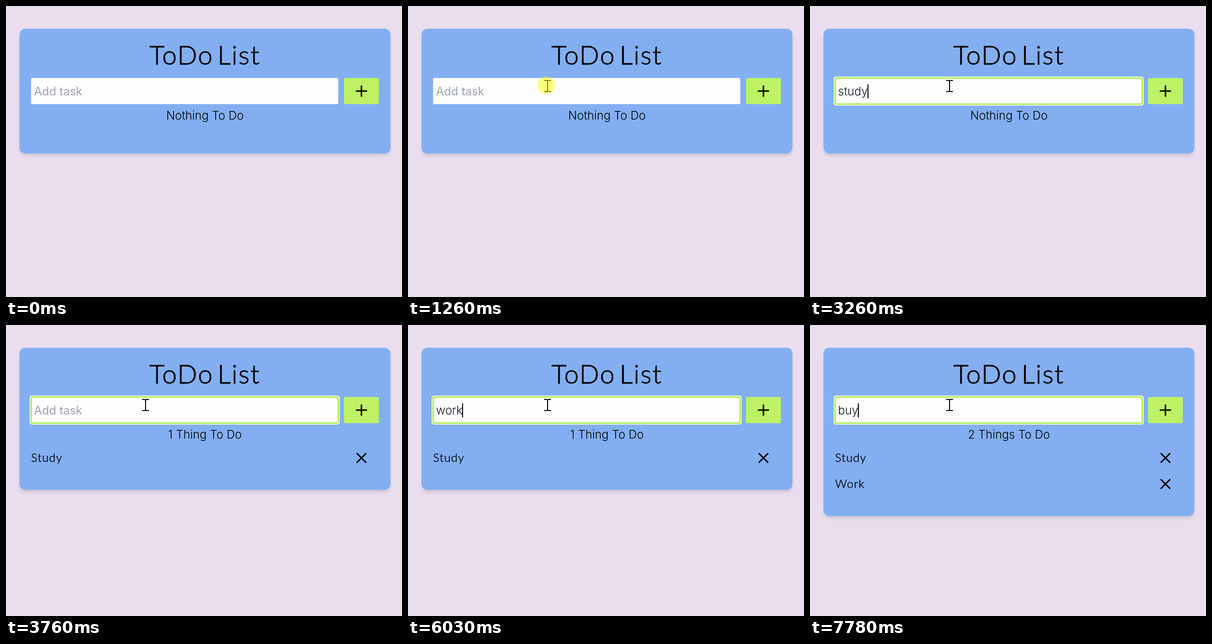
An HTML page for the animation above (8 s loop, 820 px wide and 602 px high).

```html
<!DOCTYPE html>
<html lang="en">
<head>
<meta charset="utf-8">
<title>ToDo List</title>
<style>
  html, body { margin: 0; width: 100%; height: 100%; overflow: hidden; background: #e9ddee; }
  svg { position: absolute; inset: 0; display: block; }
  #card {
    position: absolute; left: 28px; top: 47px; width: 768px; border-radius: 12px; background: #83aff2;
    box-shadow: 0 6px 9px -1.5px rgba(0,0,0,.1), 0 3px 6px -1.5px rgba(0,0,0,.06);
  }
  text { font: 24px Inter, sans-serif; white-space: pre; }
  .title { font: 300 54px Lato, sans-serif; letter-spacing: 2px; stroke: #000; stroke-width: .9; }
  .task { font: 300 24px Lato, sans-serif; letter-spacing: 1.2px; stroke: #000; stroke-width: .5; }
  #status { font-weight: 300; text-anchor: middle; }
  #hint { fill: #9ca3af; }
  #typed { font-weight: 300; fill: #111827; }
  .icon { fill: none; stroke: #000; stroke-width: 3; stroke-linecap: round; }
</style>
</head>
<body>
<div id="card"></div>
<svg width="820" height="602" viewBox="0 0 820 602">
  <rect width="820" height="1" fill="#dedbe2"/>
  <text class="title" x="297" y="120.5">ToDo</text>
  <text class="title" x="438" y="120.5">List</text>

  <rect x="52" y="149" width="636" height="54" rx="3" fill="#fefefe"/>
  <g id="ring">
    <rect x="49" y="146" width="642" height="60" rx="5" fill="#fefefe"/>
    <rect x="52" y="149" width="636" height="54" rx="3" fill="none" stroke="#a3e635" stroke-width="2.6"/>
  </g>
  <text id="hint" x="58" y="185">Add task</text>
  <text id="typed" x="58" y="185"></text>
  <rect id="caret" y="162" width="2" height="29"/>

  <rect x="700" y="149" width="72" height="54" rx="3" fill="#bef264"/>
  <path class="icon" d="M725.5 176h21M736 165.5v21"/>

  <text id="status" x="412" y="235"></text>
  <g class="row">
    <text class="task" x="52" y="283">Study</text>
    <path class="icon" d="M727 266l18 18m0-18l-18 18"/>
  </g>
  <g class="row">
    <text class="task" x="52" y="337">Work</text>
    <path class="icon" d="M727 320l18 18m0-18l-18 18"/>
  </g>

  <path id="arrow" d="M.7 1v23.6l5.6-5.2 3.6 7.2 3.2-1.6-3.5-7h7.6z" fill="#fff" stroke="#000" stroke-width="1.3"/>
  <path id="beam" d="M0 1h5q2 0 2 2q0-2 2-2h5M7 3v19M0 24h5q2 0 2-2q0 2 2 2h5" fill="none" stroke="#000" stroke-width="2"/>
  <circle id="click" cx="286" cy="164" r="18" fill="#ff0" fill-opacity=".5"/>
</svg>
<script>
const LOOP = 8000;
const $ = id => document.getElementById(id);
const rows = document.querySelectorAll('.row');

// [start, pointer, x, y]
const pointer = [
  [0, '', 0, 0],
  [250, 'arrow', 641, 469],
  [490, 'beam', 302, 151],
  [740, 'arrow', 271, 139],
  [990, 'beam', 270, 141],
  [1260, 'beam', 282, 153]
];

// [start, input text, caret visible]
const typing = [
  [0, '', false], [1510, '', true],
  [2010, 's', true], [2260, 'stu', true], [2760, 'stud', true], [3260, 'study', true],
  [3760, '', false], [4260, '', true], [4760, '', false],
  [5280, 'wo', true], [5780, 'wor', true], [6030, 'work', true],
  [6530, '', false], [7030, '', true],
  [7280, 'b', true], [7530, 'bu', true], [7780, 'buy', true]
];

// [start, status, card height]
const list = [
  [0, 'Nothing To Do', 258],
  [3760, '1 Thing To Do', 294],
  [6530, '2 Things To Do', 348]
];

const at = (steps, t) => steps.findLast(s => s[0] <= t);
const show = (el, on) => { el.style.display = on ? '' : 'none'; };

function draw(t) {
  const [, kind, x, y] = at(pointer, t);
  for (const id of ['arrow', 'beam']) {
    show($(id), id === kind);
    $(id).setAttribute('transform', `translate(${x} ${y})`);
  }
  show($('click'), t >= 1260 && t < 1510);
  show($('ring'), t >= 1510);

  const [, text, caret] = at(typing, t);
  $('typed').textContent = text;
  show($('hint'), !text);
  show($('caret'), caret);
  $('caret').setAttribute('x', 58 + (text ? Math.floor($('typed').getComputedTextLength()) : 0));

  const step = at(list, t);
  $('status').textContent = step[1];
  $('card').style.height = step[2] + 'px';
  rows.forEach((row, i) => show(row, i < list.indexOf(step)));
}

const start = performance.now();
function tick() {
  draw((performance.now() - start) % LOOP);
  requestAnimationFrame(tick);
}
tick();
</script>
</body>
</html>
```
